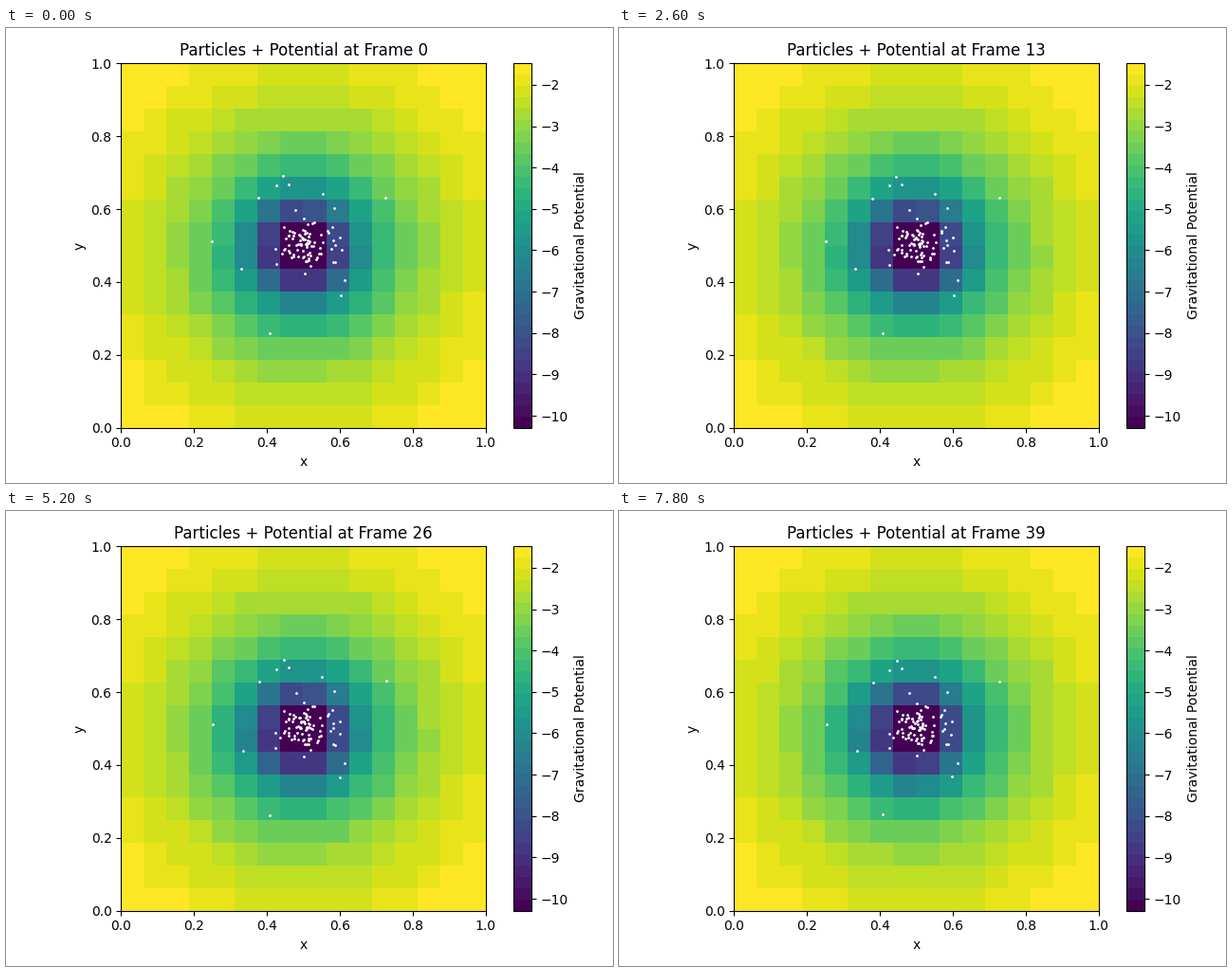
Recreate the animation shown at these times as a matplotlib script. Size 640x480 px, loop 8 s.

```python
import numpy as np
import matplotlib.pyplot as plt
from matplotlib.animation import FuncAnimation

FRAMES, STEP_MS = 40, 200
CELLS, STARS = 16, 84
CORE = 0.045          # scale radius of the cluster
VMIN, VMAX = -10.29, -1.484

# The few stars far outside the core
HALO = [(0.445, 0.690), (0.426, 0.665), (0.460, 0.668), (0.377, 0.631),
        (0.552, 0.641), (0.585, 0.602), (0.726, 0.631), (0.250, 0.511),
        (0.330, 0.436), (0.408, 0.259), (0.603, 0.363), (0.613, 0.404)]

rng = np.random.default_rng(4)


def cluster(n):
    """Plummer sphere seen along one axis, cut off before the halo."""
    mass = rng.uniform(0.02, 0.8, n)
    r = CORE / np.sqrt(mass ** (-2 / 3) - 1)
    way = rng.normal(size=(n, 3))
    way /= np.linalg.norm(way, axis=1, keepdims=True)
    return (0.5, 0.497) + r[:, None] * way[:, :2]


start = np.vstack([HALO, cluster(STARS)])
drift = rng.normal(0, 0.0025, start.shape)
pull = 0.5 - start
pull *= 0.004 / (np.hypot(*pull.T)[:, None] + 0.03)

mid = (np.arange(CELLS) + 0.5) / CELLS
gx, gy = np.meshgrid(mid, mid)


def stars(t):
    return start + drift * t + pull * t * t


def potential(t):
    r = np.hypot(gx - 0.497 + 0.002 * t, gy - 0.492 - 0.002 * t)
    softening = 0.0105 * np.exp(-r / 0.11)
    return -1 / np.sqrt(r ** 2 + softening)


def caption(k):
    return f"Particles + Potential at Frame {k}"


fig, ax = plt.subplots(figsize=(6.4, 4.8), dpi=100)
image = ax.imshow(potential(0), origin="lower", extent=(0, 1, 0, 1),
                  cmap=plt.get_cmap("viridis", 32), vmin=VMIN, vmax=VMAX,
                  interpolation="nearest")
dots = ax.scatter(*start.T, s=1, c="white")
ax.set(xlim=(0, 1), ylim=(0, 1), xlabel="x", ylabel="y")
title = ax.set_title(caption(0))
fig.colorbar(image, ax=ax, ticks=range(-10, -1),
             label="Gravitational Potential")
fig.tight_layout()


def draw(k):
    t = k / (FRAMES - 1)
    image.set_data(potential(t))
    dots.set_offsets(stars(t))
    title.set_text(caption(k))
    return image, dots, title


anim = FuncAnimation(fig, draw, frames=FRAMES, interval=STEP_MS,
                     init_func=lambda: draw(0), repeat=True, repeat_delay=0)
plt.show()
```
